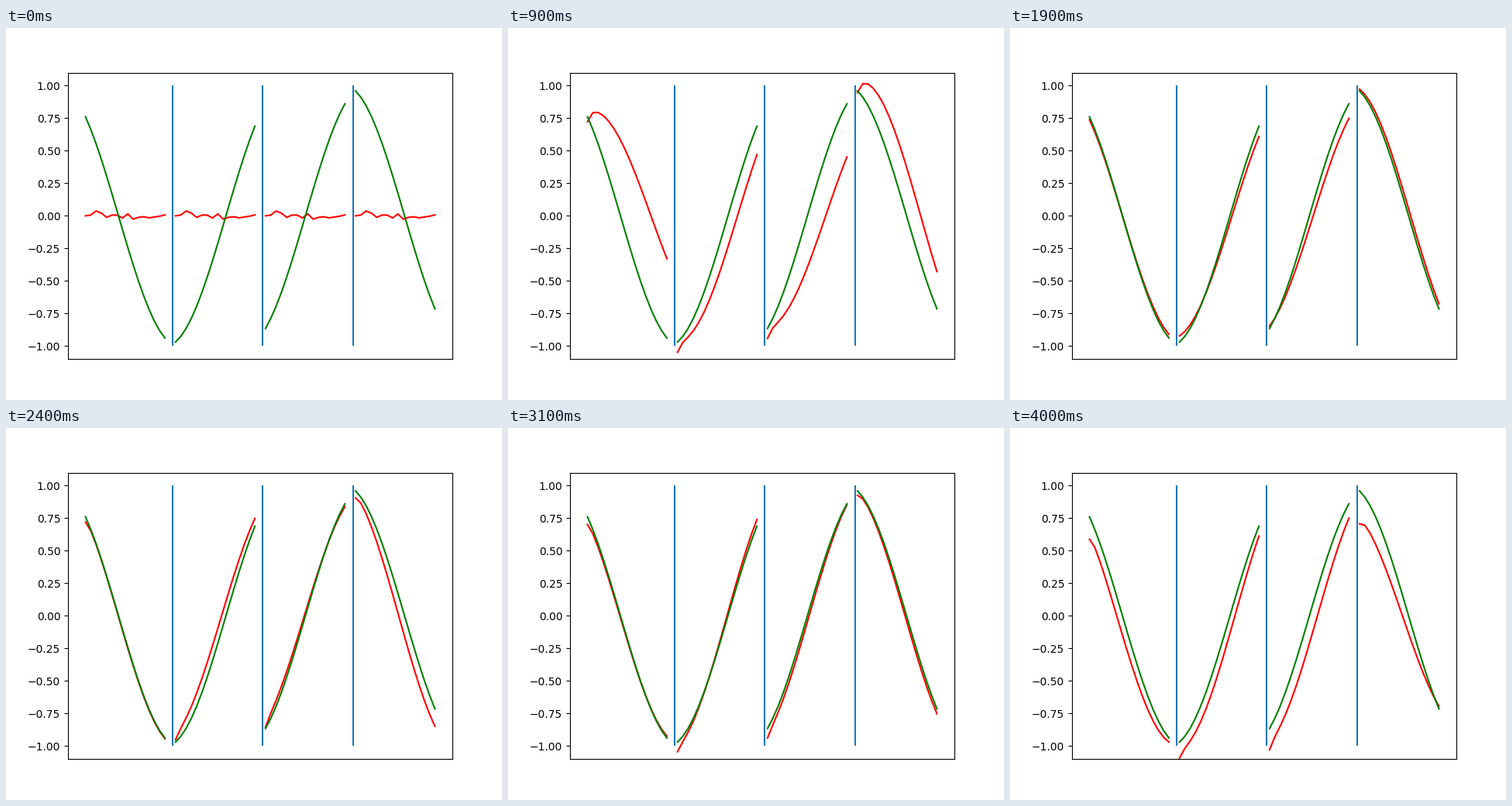
Write a matplotlib script that moves like this. It is 640x480 px and loops after 4100 ms.

```python
import numpy as np
import matplotlib.pyplot as plt
from matplotlib.animation import FuncAnimation

FRAMES, INTERVAL = 41, 100
STEPS, PITCH = 16, 17            # points per panel, panel spacing
OMEGA = 0.1388
GROWTH = 5                       # frames until the first real fit
SWELL = 0.12                     # overshoot between two key fits

# Key fits: gain and lag of each panel's wave, dip at its first points
TIMES = (0, GROWTH, 13, 19, 28, 34, 40)
GAINS = np.array([
    (.85, 1.0, .95, .98),
    (.60, .72, .58, .87),
    (.97, .94, .93, 1.0),
    (.84, .82, .80, .88),
    (.91, 1.05, 1.02, .93),
    (.99, 1.04, 1.02, .85),
])
LAGS = np.array([
    (.70, .15, .42, .27),
    (.90, .35, .54, .47),
    (0, .055, .10, .055),
    (-.01, -.25, -.13, -.32),
    (-.02, .20, .22, .24),
    (-.15, .13, .21, -.16),
])
DIPS = np.array([-.15, -.02, 0, -.07, 0, -.06])

k = np.arange(STEPS)
phase = np.array([[0.706], [3.39], [3.667], [0.2845]])
theta = phase + OMEGA * k
noise = 0.025 - 0.003 * k + np.random.default_rng(3).uniform(-.03, .03, STEPS)


def blend(keys, stage):
    """Value between two key fits; before the first one it is held."""
    pos = max(stage - 1, 0)
    i = min(int(pos), len(keys) - 2)
    return keys[i] + (pos - i) * (keys[i + 1] - keys[i])


def fit_at(frame):
    stage = np.interp(frame, TIMES, range(len(TIMES)))
    growth = 1 - max(1 - frame / GROWTH, 0) ** 2
    swell = 1 + SWELL * abs(np.sin(np.pi * stage))
    gain = swell * blend(GAINS, stage)[:, None]
    lag = blend(LAGS, stage)[:, None]
    wave = gain * np.cos(theta - lag) + blend(DIPS, stage) * np.exp(-1.5 * k)
    return growth * wave + (1 - growth) * noise


def joined(panels):
    """One polyline with a gap after each panel."""
    gaps = np.full((len(panels), 1), np.nan)
    return np.hstack([panels, gaps]).ravel()


fig, ax = plt.subplots(figsize=(6.4, 4.8), dpi=100)
ax.set_xlim(-3.3, 69.3)
ax.set_ylim(-1.1, 1.1)
ax.set_xticks([])
ax.set_yticks(np.arange(-1, 1.01, 0.25))
ax.vlines(PITCH * np.arange(1, len(phase)) - 0.5, -1, 1, color="C0")

x = np.arange(len(phase) * PITCH)
fit_line, = ax.plot(x, joined(fit_at(0)), "r-")
ax.plot(x, joined(np.cos(theta)), "g-")


def update(frame):
    fit_line.set_ydata(joined(fit_at(frame)))
    return fit_line,


anim = FuncAnimation(fig, update, frames=FRAMES, interval=INTERVAL,
                     repeat=True, repeat_delay=0)
plt.show()
```
